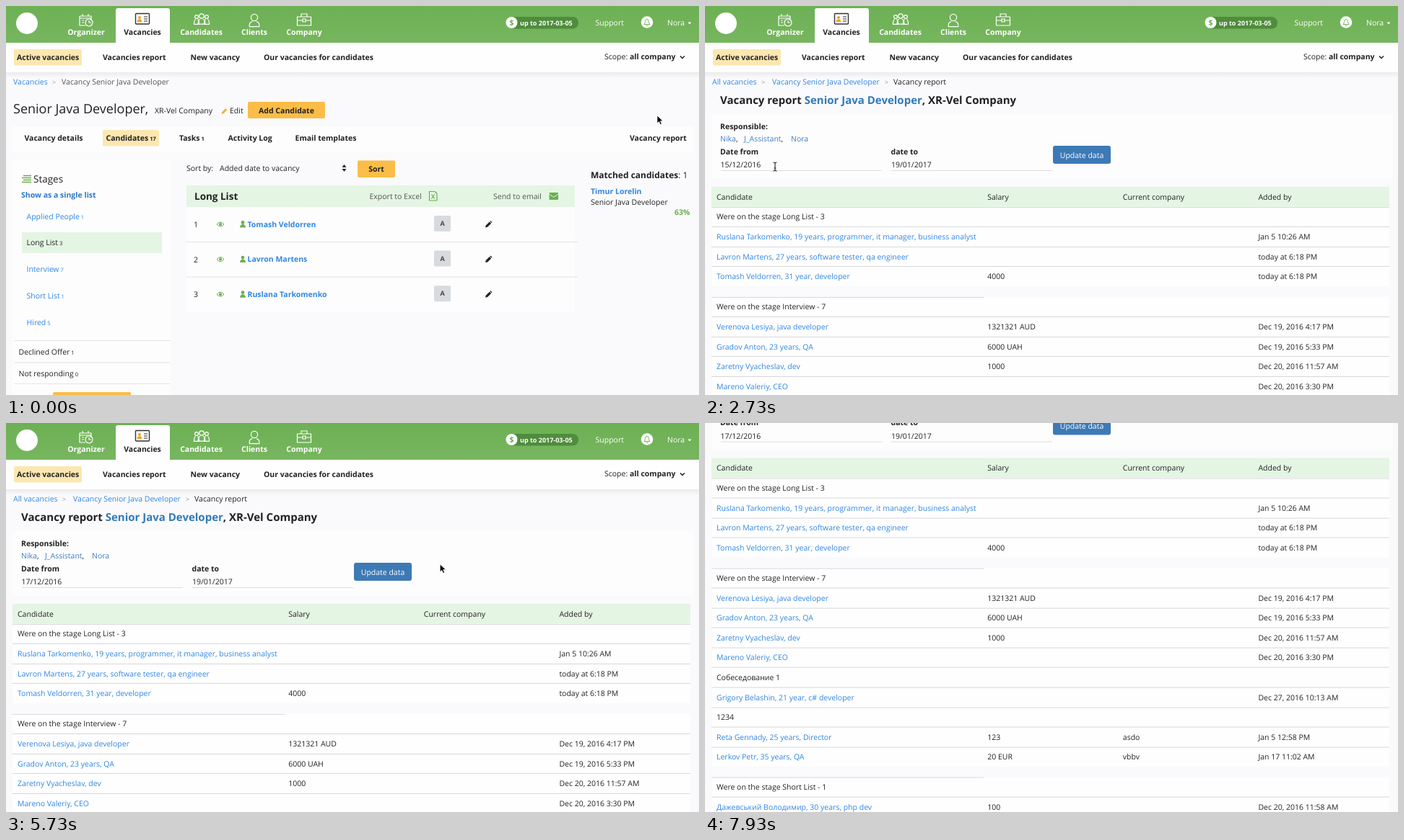
Recreate the animation shown at these times as an HTML page. Size 960 by 540 pixels, loop 8000 ms.

```html
<!DOCTYPE html>
<html lang="en">
<head>
<meta charset="utf-8">
<title>Vacancy report</title>
<style>
  html, body { margin: 0; width: 100%; height: 100%; overflow: hidden; background: #fafafc; }
  svg { display: block; width: 960px; height: 540px; overflow: hidden; }
  text { font-family: "Open Sans", sans-serif; font-size: 10.5px; fill: #222; white-space: pre; text-rendering: geometricPrecision; }
</style>
</head>
<body>
<svg id="stage" viewBox="0 0 960 540" xmlns="http://www.w3.org/2000/svg"></svg>
<script>
const LOOP = 8000, CUT = 1230, CAL_OPEN = 3300, PICKED = 4480;
const LINK = '#2f86e4', GREEN = '#6ab04f', AMBER = '#fbbd48', MINT = '#e4f5e3';

// Markup helpers; text y is the baseline
const text = (x, y, s, o = {}) =>
  `<text x="${x}" y="${y}" style="font-size:${o.size || 10.5}px;font-weight:${o.weight || 400};fill:${o.fill || '#222'}" text-anchor="${o.mid ? 'middle' : 'start'}"${o.id ? ` id="${o.id}"` : ''}>${s}</text>`;
const bold = (x, y, s, o = {}) => text(x, y, s, { ...o, weight: 700 });
const light = (x, y, s, o = {}) => text(x, y, s, { ...o, weight: 500, fill: '#fff' });
const rect = (x, y, w, h, fill, r = 0, more = '') =>
  `<rect x="${x}" y="${y}" width="${w}" height="${h}" rx="${r}" fill="${fill}" ${more}/>`;
const line = (x1, x2, y, color = '#d8d8d8', dash = '') =>
  `<path d="M${x1} ${y}H${x2}" stroke="${color}" stroke-dasharray="${dash}" fill="none"/>`;
const path = (d, stroke, fill = 'none', w = 1.2) =>
  `<path d="${d}" stroke="${stroke}" fill="${fill}" stroke-width="${w}" stroke-linejoin="round"/>`;
const at = (x, y, s) => `<g transform="translate(${x} ${y})">${s}</g>`;
const small = n => `<tspan style="font-size:7.5px"> ${n}</tspan>`;

function person(r, w) {
  return `<circle r="${r}" fill="none" stroke="#fff" stroke-width="1.2"/>` +
    path(`M${-w} ${r + 8}c0 -5 1 -6 ${w * .6} -7M${w} ${r + 8}c0 -5 -1 -6 ${-w * .6} -7M${-w} ${r + 8}H${w}`, '#fff');
}

function header() {
  const icons =
    at(111, 19, path('M-9 -5H7V1M-9 -5V8H-1M-9 -2H7M-5 -8V-5M3 -8V-5M-6 1H-3M-6 4H-3', '#fff') +
      `<circle cx="4" cy="4" r="5" fill="none" stroke="#fff" stroke-width="1.2"/>` + path('M4 1V4H7', '#fff')) +
    at(189, 18, rect(-9.5, -7.5, 19, 14.5, 'none', 1, 'stroke="#333" stroke-width="1.4"') +
      `<circle cx="-4" cy="-2" r="2" fill="#e9a32b"/>` + path('M-7.5 4c0 -5 7 -5 7 0z', 'none', '#e9a32b') +
      path('M2 -3H7M2 0H7M2 3H7', '#333')) +
    at(271, 14, person(3.2, 5)) + at(264, 15, person(2.4, 3.6)) + at(278, 15, person(2.4, 3.6)) +
    at(344, 16, person(4.6, 7)) +
    at(413, 19, path('M-9.5 -4H9.5V8H-9.5zM-4 -4V-8H4V-4M-9.5 1H-2M2 1H9.5M-2 -1H2V3H-2z', '#fff'));
  const labels = [['Organizer', 111], ['Vacancies', 189], ['Candidates', 270.5], ['Clients', 344], ['Company', 413]]
    .map(([s, x]) => bold(x, 40, s, { mid: 1, fill: s == 'Vacancies' ? '#222' : '#fff' })).join('');
  return rect(0, 91, 960, 9, 'url(#shade)') + rect(0, 51, 960, 41, '#fefefe') + rect(0, 0, 960, 51, 'url(#grass)') +
    `<circle cx="29" cy="24" r="15" fill="#fff"/>` + rect(152, 3, 75, 50, '#fefefe', 3) + icons + labels +
    rect(693, 15, 100, 16.5, '#4f8c3c', 8) + `<circle cx="700.5" cy="23" r="8" fill="#fff"/>` +
    bold(700.5, 27, '$', { mid: 1, fill: GREEN }) + bold(712, 26.5, 'up to 2017-03-05', { size: 9, fill: '#fff' }) +
    light(816.5, 26.5, 'Support') + `<circle cx="888" cy="22.5" r="8.3" fill="#fff"/>` +
    path('M884 25.5c2 -2 1 -7 4 -7s2 5 4 7zM887 27.3h2', GREEN, 'none', 1) +
    light(916, 27, 'Nora') + path('M944.5 22.5h5l-2.5 3z', 'none', '#fff') +
    rect(11, 60, 94, 22.5, '#fce7b1', 2) +
    [[15, 'Active vacancies'], [134, 'Vacancies report'], [255.5, 'New vacancy'], [357, 'Our vacancies for candidates']]
      .map(([x, s]) => bold(x, 75, s)).join('') +
    text(829, 74, 'Scope: <tspan style="font-weight:700">all company</tspan>') + path('M934 69.5l3 3 3 -3', '#222', 'none', 1.5);
}

function listPage() {
  const stages = [['Applied People', 1], ['Long List', 3], ['Interview', 7], ['Short List', 1], ['Hired', 5]]
    .map(([s, n], i) => text(28.5, 295.5 + 36.8 * i, s + small(n), { fill: i == 1 ? '#222' : LINK })).join('');
  const people = ['Tomash Veldorren', 'Lavron Martens', 'Ruslana Tarkomenko'].map((name, i) => at(0, 48.6 * i,
    text(260, 307, i + 1) +
    path('M292 303q5 -6 10 0q-5 6 -10 0z', GREEN, 'none', 1) + `<circle cx="297" cy="303" r="2" fill="${GREEN}"/>` +
    `<circle cx="328" cy="300.5" r="2.4" fill="${GREEN}"/>` + path('M324 307.5c0 -6 8 -6 8 0z', 'none', GREEN) +
    bold(334.5, 306.5, name, { fill: LINK }) +
    rect(593, 291, 23, 22, '#d7dbdf', 2) + bold(604.5, 305, 'A', { size: 9, mid: 1, fill: '#444' }) +
    path('M664 307.5l.8 -3 5 -5 2.3 2.3 -5 5z', 'none', '#222') + path('M670.3 298.8l.9 -.9 2.3 2.3 -.9 .9z', 'none', '#222') +
    (i < 2 ? line(250, 791, 327.5, '#ccc', '1 1') : ''))).join('');
  return rect(9, 167, 943, 36, '#fdfdfd') + rect(9, 214, 219, 326, '#fdfdfd') + rect(250, 249, 538, 176, '#fdfdfd') +
    text(10, 109, 'Vacancies', { fill: LINK }) + text(64, 109, '&gt;', { size: 9, fill: '#999' }) +
    text(77, 109, 'Vacancy Senior Java Developer', { fill: '#555' }) +
    text(10, 149, 'Senior Java Developer,', { size: 18 }) + text(206, 149, 'XR-Vel Company') +
    path('M298.5 150l.8 -3 5 -5 2.2 2.2 -5 5z', 'none', '#f0b43c') + text(310, 149, 'Edit') +
    rect(335, 133, 107, 23, AMBER, 2) + bold(388.5, 148.5, 'Add Candidate', { mid: 1 }) +
    rect(134, 172, 78, 22.5, '#fce7b1', 2) +
    [[25.5, 'Vacancy details'], [138.5, 'Candidates' + small(17)], [240, 'Tasks' + small(1)], [307.5, 'Activity Log'], [400.5, 'Email templates']]
      .map(([x, s]) => bold(x, 187, s)).join('') +
    rect(859.5, 171.5, 88, 23, '#fff', 2, 'id="hover" stroke="#f7e6c2"') + bold(864, 187, 'Vacancy report') +
    path('M24 235.5H35M22 238.5H35M24 241.5H35M22 244.5H35', GREEN, 'none', 1.6) + text(38, 245, 'Stages', { size: 13.5 }) +
    bold(21, 266, 'Show as a single list', { fill: '#2a78cc' }) + rect(22, 314, 194, 29, MINT) + stages +
    [464.5, 495, 524.5].map(y => line(12, 228, y, '#ccc', '1 1')).join('') +
    text(17.5, 484, 'Declined Offer' + small(1)) + text(17.5, 514, 'Not responding' + small(0)) + rect(65, 536, 108, 10, AMBER, 2) +
    text(250, 228.5, 'Sort by:') + text(296, 228.5, 'Added date to vacancy') +
    path('M465.5 224l3 -4 3 4zM465.5 226l3 4 3 -4z', 'none', '#222') +
    rect(487, 214.5, 52, 23.5, AMBER, 2) + bold(513, 230, 'Sort', { mid: 1 }) +
    rect(250, 249, 538, 30, MINT) + bold(261, 269, 'Long List', { size: 13.5 }) +
    text(503.5, 268, 'Export to Excel', { fill: '#555' }) +
    path('M586.5 257.5h7.5l3 3v9.5h-10.5zM589.5 261.5l4 6M593.5 261.5l-4 6', GREEN) +
    text(675, 268, 'Send to email', { fill: '#555' }) + rect(752.5, 259, 12.5, 10, GREEN, 1) +
    path('M752.5 261l6.2 4.5 6.2 -4.5', MINT, 'none', 1) + people +
    bold(810, 238.5, 'Matched candidates<tspan style="font-weight:400">: 1</tspan>', { size: 12 }) +
    bold(810, 261, 'Timur Lorelin', { fill: LINK }) + text(810, 275.5, 'Senior Java Developer') +
    bold(926, 289.5, '63%', { fill: GREEN });
}

function reportPage() {
  // Each group: centre of its first row, then rows of candidate, salary, company, date
  const groups = [
    [265, ['Candidate', 'Salary', 'Current company', 'Added by'], ['Were on the stage Long List - 3'],
      ['Ruslana Tarkomenko, 19 years, programmer, it manager, business analyst', '', '', 'Jan 5 10:26 AM'],
      ['Lavron Martens, 27 years, software tester, qa engineer', '', '', 'today at 6:18 PM'],
      ['Tomash Veldorren, 31 year, developer', '4000', '', 'today at 6:18 PM']],
    [417.5, ['Were on the stage Interview - 7'],
      ['Verenova Lesiya, java developer', '1321321 AUD', '', 'Dec 19, 2016 4:17 PM'],
      ['Gradov Anton, 23 years, QA', '6000 UAH', '', 'Dec 19, 2016 5:33 PM'],
      ['Zaretny Vyacheslav, dev', '1000', '', 'Dec 20, 2016 11:57 AM'],
      ['Mareno Valeriy, CEO', '', '', 'Dec 20, 2016 3:30 PM'], ['Собеседование 1'],
      ['Grigory Belashin, 21 year, c# developer', '', '', 'Dec 27, 2016 10:13 AM'], ['1234'],
      ['Reta Gennady, 25 years, Director', '123', 'asdo', 'Jan 5 12:58 PM'],
      ['Lerkov Petr, 35 years, QA', '20 EUR', 'vbbv', 'Jan 17 11:02 AM']],
    [707.7, ['Were on the stage Short List - 1'],
      ['Дажевський Володимир, 30 years, php dev', '100', '', 'Dec 20, 2016 11:58 AM']]];
  const table = groups.map(([top, ...rows], g) =>
    rect(9, top - 14, 939, rows.length * 27.6, '#fefefe') +
    (g ? line(9, 386, Math.round(top - 14) + .5) : rect(9, 251, 939, 27.5, MINT)) +
    rows.map((cells, i) => {
      const y = top + 27.62 * i, head = !g && !i;
      return cells.map((s, c) => s && text(16 + 187.6 * (c && c + 1), y + 3.8, s,
        { fill: !c && !head && cells.length > 1 ? LINK : '#222' })).join('') +
        (i < rows.length - 1 ? line(9, 948, Math.round(y + 13.5) + .5) : '');
    }).join('')).join('');
  return rect(9, 150, 943, 90, '#fdfdfd') +
    text(10, 109, 'All vacancies', { fill: LINK }) + text(78, 109, '&gt;', { size: 9, fill: '#999' }) +
    text(93, 109, 'Vacancy Senior Java Developer', { fill: LINK }) + text(249, 109, '&gt;', { size: 9, fill: '#999' }) +
    text(261, 109, 'Vacancy report') +
    bold(21, 135.5, 'Vacancy report <tspan style="fill:#337ab7">Senior Java Developer</tspan>, XR-Vel Company', { size: 15 }) +
    bold(21, 171, 'Responsible:') +
    [[21, 'Nika'], [54, 'J_Assistant'], [119, 'Nora']].map(([x, s], i) =>
      text(x, 187.5, s + (i < 2 ? '<tspan style="fill:#222">,</tspan>' : ''), { fill: '#3f7fc0' })).join('') +
    bold(21, 205.5, 'Date from') + bold(257.5, 205.5, 'date to') +
    text(21.5, 224, '', { id: 'from' }) + text(258, 224, '19/01/2017') +
    line(22, 245, 228.5, '#ddd') + line(258, 481, 228.5, '#ddd') +
    rect(482, 194, 80, 25, '#3d7ab5', 3, 'id="update"') + light(522, 210.8, 'Update data', { mid: 1 }) + table;
}

function calendar() {
  const cols = [35, 57, 79.5, 102, 124.5, 145, 165.5];
  let s = rect(20.5, 231, 159.5, 182, '#000', 4, 'opacity=".07"') +
    rect(21.5, 230.5, 157.5, 179.5, '#fff', 3, 'stroke="#ccc"') + path('M25 231l6 -6 6 6', '#ccc', '#fff', 1) +
    bold(100, 248, 'December 2016', { mid: 1 }) + rect(114, 320, 21, 22, '#1c3a8c', 2);
  'Su Mo Tu We Th Fr Sa'.split(' ').forEach((d, i) => s += bold(cols[i], 270, d, { mid: 1 }));
  for (let i = 0; i < 42; i++) {
    const day = new Date(2016, 10, 27 + i).getDate(), y = 292 + 21.75 * Math.floor(i / 7);
    const fill = i == 18 ? '#fff' : i < 18 || i > 34 ? '#999' : '#222';
    s += text(cols[i % 7], y, day, { mid: 1, fill, weight: i == 18 ? 700 : 400 });
  }
  return s;
}

const $ = id => document.getElementById(id);
const gradient = (id, a, b) => `<linearGradient id="${id}" x2="0" y2="1"><stop stop-color="${a}"/><stop offset="1" stop-color="${b}"/></linearGradient>`;
$('stage').innerHTML = `<defs>${gradient('grass', '#6db054', '#77b65f')}${gradient('shade', '#e9e9ec', '#fafafc')}</defs>` +
  rect(0, 0, 960, 540, '#fafafc') +
  `<g id="page">${header()}<g id="list">${listPage()}</g><g id="report">${reportPage()}</g><g id="cal">${calendar()}</g></g>` +
  `<circle id="ring" fill="none" stroke="#ee4520" stroke-width="3.4"/>
  <g id="cursor">
    <g id="arrow">${path('M0 0V11l2.6 -2.4 1.8 4 2 -.9 -1.8 -3.9h3.6z', '#fff', '#000', .8)}</g>
    <g id="hand">${path('M-1 1c0 -1.6 2 -1.6 2 0V5h5c1.2 0 1.5 1 1.3 2.2l-.9 4.8h-6.4l-4 -4.6c-.8 -1.3 .8 -2 1.8 -1l1.2 1.2z', '#000', '#fff', 1.1)}${path('M3 5.2v2M5 5.2v2', '#000', 'none', .8)}</g>
    <g id="beam">${path('M-2.5 -6q2.5 0 2.5 1.5q0 -1.5 2.5 -1.5M0 -4.5V4.5M-2.5 6q2.5 0 2.5 -1.5q0 1.5 2.5 1.5M-1.5 2h3', '#222', 'none', 1.1)}</g>
  </g>`;

const smooth = p => p < .5 ? 2 * p * p : 1 - 2 * (1 - p) ** 2;
const easeOut = p => 1 - (1 - p) ** 2;

// Cursor legs: start, end, from, bend, to, easing
const legs = [
  [30, 560, [902, 152], [899, 166], [897, 182], smooth],
  [1930, 2730, [897, 182], [500, 208], [97, 223], smooth],
  [3430, 4130, [97, 223], [122, 285], [166, 327], smooth],
  [PICKED, 5160, [166, 327], [402, 213.5], [471, 229], easeOut],
  [5430, 6230, [471, 229], [700, 150], [935, 216], smooth],
  [6260, 6560, [935, 216], [948, 218], [964, 222], smooth],
];
const clicks = [[800, 898, 182], [3030, 97, 223], [4183, 166, 327]];
const scrollStops = [[7500, 25], [7610, 85], [7715, 145], [7820, 186], [7930, 202.4]];

function cursorAt(t) {
  const [a, b, p, q, r, ease] = legs.filter(l => t >= l[0]).pop() || legs[0];
  const u = ease(Math.min(1, Math.max(0, (t - a) / (b - a)))), v = 1 - u;
  return p.map((_, i) => v * v * p[i] + 2 * u * v * q[i] + u * u * r[i]);
}
const inside = ([x, y], l, t, r, b) => x >= l && x <= r && y >= t && y <= b;
const show = (id, on) => $(id).setAttribute('display', on ? 'inline' : 'none');

function draw(t) {
  const report = t >= CUT, open = t >= CAL_OPEN && t < PICKED, pos = cursorAt(t);
  const onTab = !report && inside(pos, 859, 171, 948, 195);
  const onUpdate = report && inside(pos, 482, 194, 562, 219);
  const onDays = open && inside(pos, 22, 276, 179, 410);
  const onField = report && (inside(pos, 22, 211, 245, 228.8) || inside(pos, 258, 211, 470, 228.8));
  const kind = onTab || onUpdate || onDays ? 'hand' : onField ? 'beam' : 'arrow';

  show('list', !report);
  show('report', report);
  show('cal', open);
  show('hover', onTab);
  $('update').setAttribute('fill', onUpdate ? '#2e6699' : '#3d7ab5');
  $('from').textContent = t < PICKED ? '15/12/2016' : '17/12/2016';

  const stop = scrollStops.filter(s => t >= s[0]).pop();
  $('page').setAttribute('transform', `translate(0 ${stop ? -stop[1] : 0})`);

  ['arrow', 'hand', 'beam'].forEach(k => show(k, k == kind));
  show('cursor', t < 6560);
  $('cursor').setAttribute('transform', `translate(${pos})`);

  const click = clicks.find(c => t >= c[0] && t < c[0] + 300);
  show('ring', click);
  if (click) {
    const age = t - click[0], ring = $('ring');
    ring.setAttribute('cx', click[1]);
    ring.setAttribute('cy', click[2]);
    ring.setAttribute('r', age * .094);
    ring.setAttribute('opacity', Math.min(1, (300 - age) / 90));
  }
}

const begin = performance.now();
function tick() {
  draw((performance.now() - begin) % LOOP);
  requestAnimationFrame(tick);
}
tick();
</script>
</body>
</html>
```
